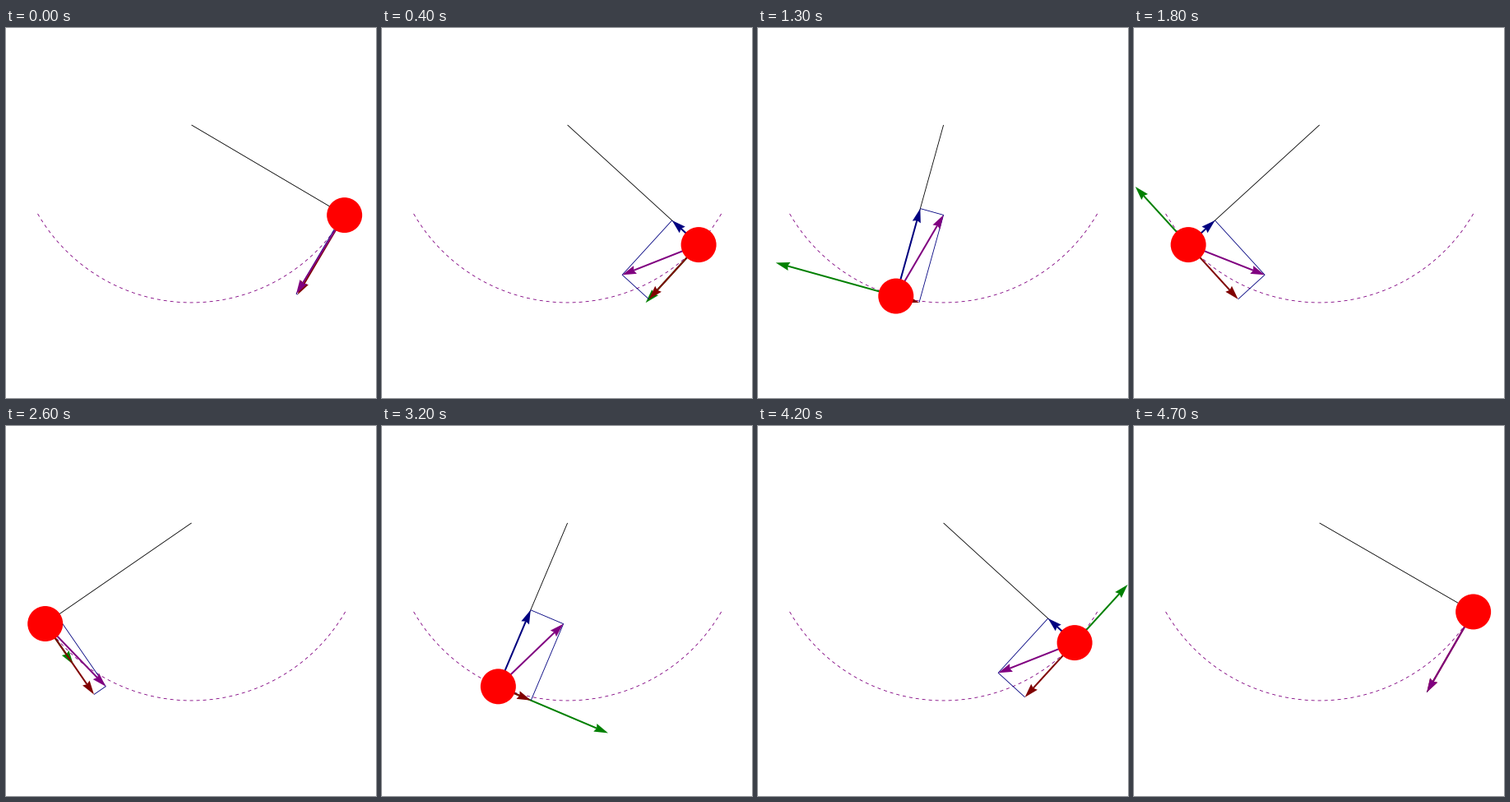
Animation, 450 px wide and 450 px high, one loop 4.8 s. Source, as a matplotlib script:

```python
import numpy as np
import matplotlib.pyplot as plt
from matplotlib.animation import FuncAnimation
from matplotlib.patches import Circle, Polygon

SIZE, DPI = 450, 100
FRAMES, INTERVAL = 48, 100
PX = 72 / DPI

PIVOT = np.array([225.6, 117.95])
LENGTH, RADIUS = 216, 21.5
SWING = np.pi / 3
SPEED = 50 * np.pi          # arrow length at peak speed
ACCEL = LENGTH * SWING / 2  # arrow length at peak tangential acceleration
HEAD, NOTCH, WING = 17, 15, 5.2
THIN, THICK = 0.85, 2
DASH = 2 * SWING * LENGTH / 113  # odd count, so both ends carry a dash

fig = plt.figure(figsize=(SIZE / DPI, SIZE / DPI), dpi=DPI, facecolor="white")
ax = fig.add_axes([0, 0, 1, 1])
ax.set(xlim=(0, SIZE), ylim=(SIZE, 0))
ax.axis("off")


def make_line(color, width, z, **kw):
    return ax.plot([], [], color=color, lw=width * PX, zorder=z,
                   solid_capstyle="butt", **kw)[0]


def set_points(line, *points):
    line.set_data(*np.array(points).T)


class Arrow:
    def __init__(self, color, z):
        self.shaft = make_line(color, THICK, z)
        self.head = Polygon(np.zeros((4, 2)), closed=True, fc=color, lw=0, zorder=z)
        ax.add_patch(self.head)

    def place(self, base, vec, fallback):
        size = np.hypot(*vec)
        d = vec / size if size > 1e-6 else fallback
        n = np.array([-d[1], d[0]])
        tip = base + vec
        set_points(self.shaft, base, base + d * max(size - NOTCH, 0))
        self.head.set_xy([tip, tip - HEAD * d + WING * n,
                          tip - NOTCH * d, tip - HEAD * d - WING * n])


def bob_at(theta):
    return PIVOT + LENGTH * np.array([np.sin(theta), np.cos(theta)])


path = make_line("purple", THIN, 1, dashes=(DASH / THIN, DASH / THIN),
                 dash_capstyle="butt")
set_points(path, *[bob_at(a) for a in np.linspace(-SWING, SWING, 200)])

string = make_line("black", THIN, 2)
velocity = Arrow("green", 3)
frame = make_line("navy", THIN, 4)
tangential = Arrow("maroon", 5)
radial = Arrow("navy", 6)
total = Arrow("purple", 7)
ball = ax.add_patch(Circle((0, 0), RADIUS, fc="red", lw=0, zorder=8))


def update(i):
    phase = 2 * np.pi * (i + 1) / FRAMES
    theta = SWING * np.cos(phase)
    bob = bob_at(theta)
    along = np.array([np.cos(theta), -np.sin(theta)])
    inward = -np.array([np.sin(theta), np.cos(theta)])

    vel = -SPEED * np.sin(phase) * along
    tan = -ACCEL * np.cos(phase) * along
    rad = ACCEL * SWING * np.sin(phase) ** 2 * inward

    set_points(string, PIVOT, bob)
    velocity.place(bob, vel, along)
    tangential.place(bob, tan, along)
    radial.place(bob, rad, inward)
    total.place(bob, tan + rad, inward)
    set_points(frame, bob + rad, bob + rad + tan, bob + tan)
    ball.center = bob
    return ()


anim = FuncAnimation(fig, update, frames=FRAMES, interval=INTERVAL,
                     init_func=lambda: update(0), repeat=True, repeat_delay=0)
plt.show()
```
